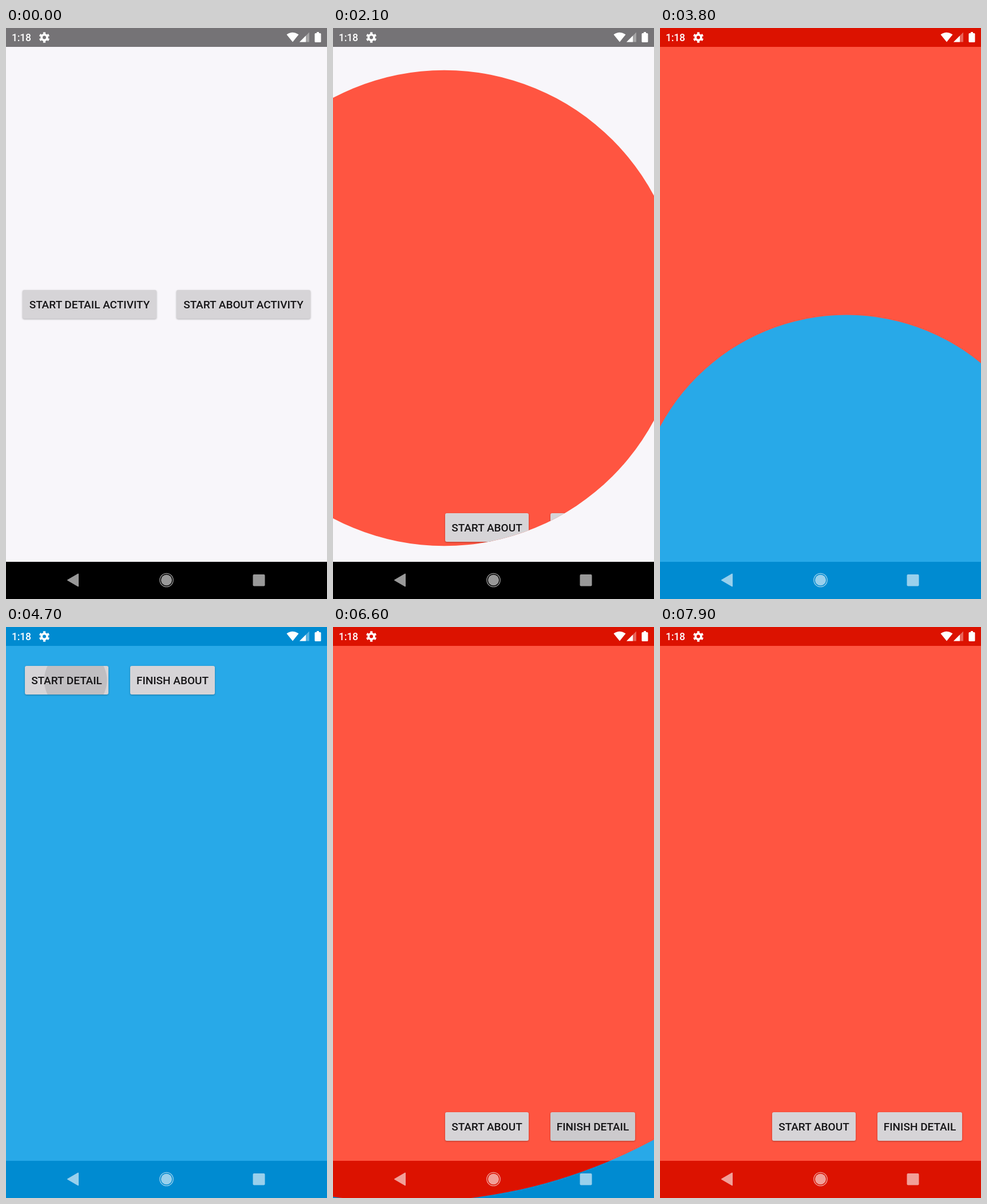
Animation of 561 by 998 pixels, one loop 8 s. Source, as an HTML page:

```html
<!DOCTYPE html>
<html lang="en">
<head>
<meta charset="utf-8">
<title>Circular reveal</title>
<style>
  html, body { margin: 0; width: 100%; height: 100%; overflow: hidden; }
  .page, svg { position: absolute; left: 0; top: 0; width: 561px; height: 998px; }
  .page {
    box-sizing: border-box;
    border: solid var(--bar);
    border-width: 33px 0 65px;
    background: var(--bg);
  }
  .home { --bg: #f8f6fa; --bar: #757376; border-bottom-color: #000; }
  .detail { --bg: #ff5541; --bar: #dc1200; }
  .about { --bg: #28a9e8; --bar: #008bd1; }
  .button {
    position: absolute;
    height: 50px;
    border-radius: 3px;
    background: #d6d4d7;
    box-shadow: 0 1px 3px rgba(0, 0, 0, .3);
    color: #151416;
    font: 500 19px/51px Roboto, sans-serif;
    text-align: center;
    white-space: nowrap;
    overflow: hidden;
  }
  .ripple { position: absolute; inset: 0; background: #000; opacity: 0; }
  svg text { font: 500 17.5px Roboto, sans-serif; letter-spacing: -.2px; }
</style>
</head>
<body>
<svg viewBox="0 0 561 998" fill="#fff" style="z-index:1">
  <text x="10" y="23">1:18</text>
  <g fill="none" stroke="#fff">
    <circle cx="67" cy="16.5" r="4.9" stroke-width="3.8"/>
    <circle cx="67" cy="16.5" r="7.6" stroke-width="3.4" pathLength="24"
      stroke-dasharray="2 2" stroke-dashoffset="-1"/>
  </g>
  <path d="M501 24.5L490.5 11.5Q501 4 511.5 11.5Z"/>
  <path d="M513 24.5L530 7.5V24.5Z" opacity=".35"/>
  <path d="M513 24.5L524 13.5V24.5Z"/>
  <path d="M543 7h4v2h2q1.500 0 1.500 1.500v13q0 1.500-1.500 1.500h-8q-1.500 0-1.500-1.500v-13q0-1.500 1.500-1.500h2z"/>
  <g opacity=".6">
    <path d="M108 965L126 954.500V975.500Z" stroke="#fff" stroke-width="2" stroke-linejoin="round"/>
    <circle cx="280.500" cy="965" r="9.600"/>
    <circle cx="280.500" cy="965" r="11.700" fill="none" stroke="#fff" stroke-width="1.300"/>
    <rect x="431.500" y="955" width="21" height="20.500" rx="2"/>
  </g>
</svg>
<script>
const LOOP = 8000, STEP = 100, REVEAL = 500, MAX_RADIUS = 998 * 1.1;
const clamp = v => Math.min(1, Math.max(0, v));
const ease = v => (1 - Math.cos(Math.PI * clamp(v))) / 2;
const mix = (a, b, k) => a + (b - a) * k;

function add(parent, className, text = '') {
  const el = document.createElement('div');
  el.className = className;
  el.textContent = text;
  parent.append(el);
  return el;
}

function makeButton(page, text, x, y, w) {
  const el = add(page, 'button', text);
  Object.assign(el.style, { left: x + 'px', top: y - 33 + 'px', width: w + 'px' });
  return { x, y, w, ripple: add(el, 'ripple') };
}

function makePage(kind, buttons) {
  const el = add(document.body, 'page ' + kind);
  return { el, buttons: buttons.map(b => makeButton(el, ...b)) };
}

const detailButtons = [['START ABOUT', 196, 847.5, 146], ['FINISH DETAIL', 380, 847.5, 148]];
const home = makePage('home', [
  ['START DETAIL ACTIVITY', 29, 458, 234], ['START ABOUT ACTIVITY', 298, 458, 234]]);
const detail = makePage('detail', detailButtons);
const about = makePage('about', [
  ['START DETAIL', 33, 68, 146], ['FINISH ABOUT', 217, 68, 148]]);
const detailAgain = makePage('detail', detailButtons);

const reveals = [
  { page: detail, x: 194.5, y: 489.5, open: 1889, close: Infinity },
  { page: about, x: 326, y: 871, open: 3603, close: 7365 },
  { page: detailAgain, x: 129, y: 93, open: 5090, close: 6465 }
];

const taps = [
  { button: home.buttons[0], at: 1500, x: 194.5, y: 489.5, hold: 300 },
  { button: detail.buttons[0], at: 3200, x: 326, y: 871, hold: 300 },
  { button: about.buttons[0], at: 4700, x: 129, y: 93, hold: 300 },
  { button: detailAgain.buttons[1], at: 6300, x: 460, y: 872, hold: 370 },
  { button: about.buttons[1], at: 7200, x: 296, y: 93, hold: 370 }
];

function drawReveal({ page, x, y, open, close }, t) {
  const k = ease((t - open) / REVEAL) - ease((t - close) / REVEAL);
  page.el.style.clipPath = `circle(${k * MAX_RADIUS}px at ${x}px ${y}px)`;
}

// The ripple grows while its centre drifts to the middle of the button.
function drawTap({ button, at, x, y, hold }, t) {
  const age = t - at, { w, ripple } = button;
  const k = 1 - (1 - clamp((age + 40) / 225)) ** 2;
  const r = mix(w * .3, Math.hypot(w / 2, 25) + 1, k);
  const cx = mix(x - button.x, w / 2, k), cy = mix(y - button.y, 25, k);
  ripple.style.clipPath = `circle(${r}px at ${cx}px ${cy}px)`;
  ripple.style.opacity = age < 0 ? 0 : .1 * clamp((hold - age) / 150);
}

const start = performance.now();
function frame() {
  const t = Math.floor((performance.now() - start) % LOOP / STEP) * STEP;
  reveals.forEach(r => drawReveal(r, t));
  taps.forEach(p => drawTap(p, t));
  requestAnimationFrame(frame);
}
frame();
</script>
</body>
</html>
```
